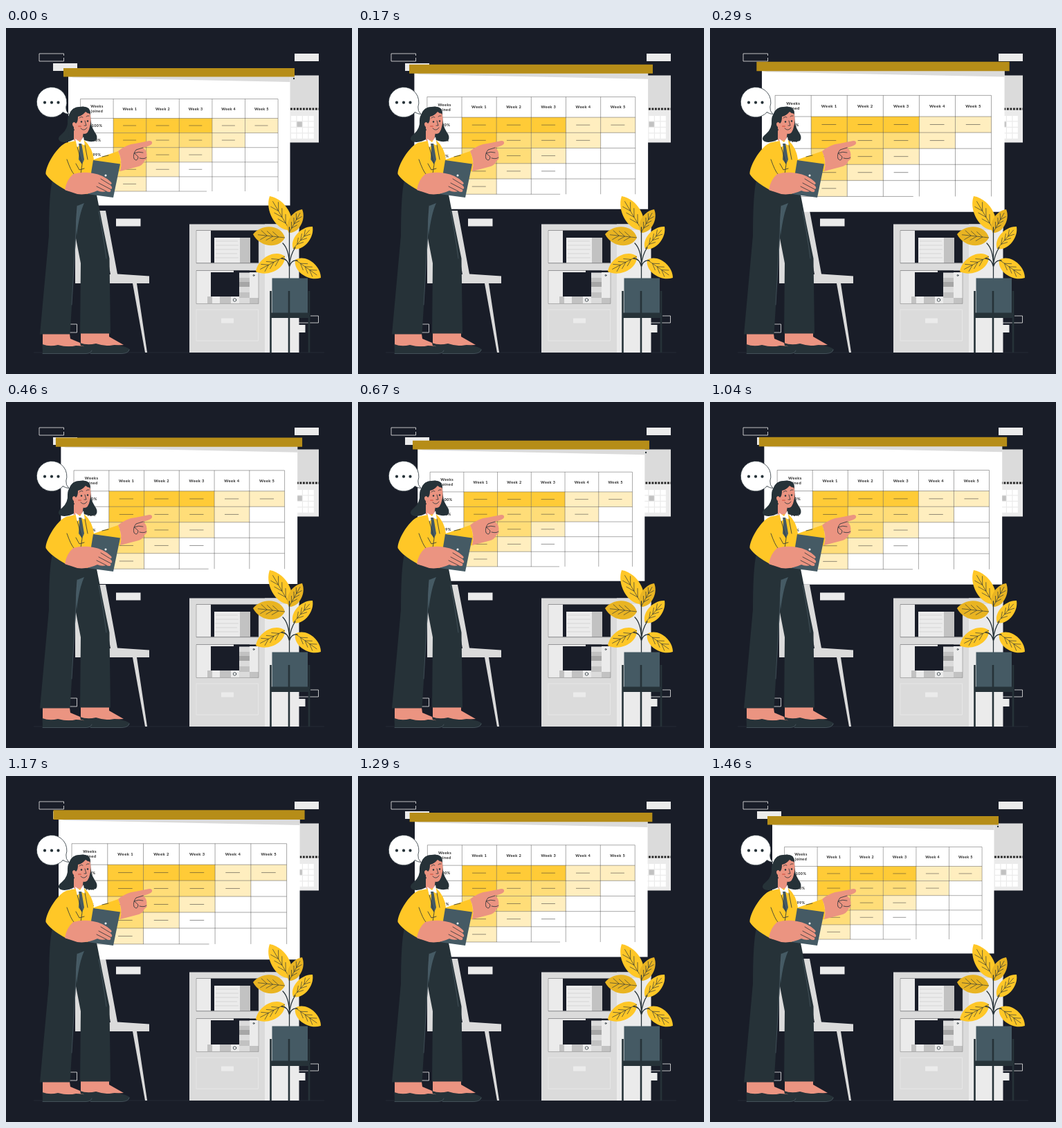
An HTML page that plays this animation: 500x500 px, repeating every 1.5 s.

```html
<!DOCTYPE html>
<html lang="en">
<head>
<meta charset="utf-8">
<title>Weekly retention board</title>
<style>
  html, body { margin: 0; width: 100%; height: 100%; overflow: hidden; background: #191d28; }
  svg { display: block; width: 100vw; height: 100vh; }
  text { font: 700 5.4px Lato, sans-serif; letter-spacing: .4px; text-anchor: middle; fill: #222; }
  .light { fill: #ebebeb; }
  .grey { fill: #dbdbdb; }
  .mid { fill: #c2c2c2; }
  .dark { fill: #263238; }
  .slate { fill: #455a64; }
  .night { fill: #191d28; }
  .gold { fill: #ffc727; }
  .skin { fill: #eb9481; }
  .line { fill: none; stroke: #263238; stroke-width: .8; stroke-linecap: round; stroke-linejoin: round; }
  .edge { fill: none; stroke: #ebebeb; stroke-width: .8; }
</style>
</head>
<body>
<svg viewBox="0 0 500 500">
  <!-- backdrop -->
  <path class="edge" d="M83.500 40V37H48V48H83.500V43M84 428H102.500V440H90M417 426H451.500V416H440"/>
  <path class="light" d="M68 51h35v11h-35zM417 37h35v11h-35zM159 275.500h35.500v11h-35.500zM397 429h35.500v11h-35.500z"/>
  <path d="M40 469H460" stroke="#2a303a" stroke-width=".7"/>
  <g id="calendar">
    <path class="grey" d="M400 68.500h52v51h-52z"/>
    <path class="light" d="M400 119h52v46.500h-52z"/>
    <circle cx="416" cy="73" r="1.200" class="dark"/>
    <path d="M402 117H452" stroke="#222" stroke-width="2.800" stroke-dasharray="2.800 1.700"/>
  </g>

  <!-- cabinet -->
  <path class="grey" d="M265 283.500H374V469H265z"/>
  <path class="light" d="M374 283.500H423.500V469H374z"/>
  <path class="grey" d="M374 283.500H423.500V292H374z"/>
  <path class="night" d="M275 292.500H365V339.500H275zM275 350.500H365V398H275z"/>
  <path class="light" d="M275 292.500h21v47h-21zM301 303h37v36.500h-37zM275 350.500h21v47.500h-21zM296 350.500h33v2.500h-33zM337 353h28v45h-28zM297 388h40v10h-40z"/>
  <path class="mid" d="M338 303h15v36.500h-15zM291 388h7v10h-7zM309 388h16v10h-16zM337 361h15v6h-15zM337 382h15v8h-15zM352 390h13v8h-13z"/>
  <path d="M337 367h15v7h-15z" fill="#a6a6a6"/>
  <path d="M337 353h15v8h-15zM337 374h15v8h-15zM337 390h15v8h-15z" class="grey"/>
  <path d="M303 308h32M303 314h33M302 320h34M303 326h31M302 332h34" stroke="#ccc" stroke-width=".7"/>
  <path class="line" d="M275 339.500V292.500H365V339.500zM275 398V350.500H365V398z" style="stroke:#777;stroke-width:.5"/>
  <path d="M329 352H352" stroke="#191d28" stroke-width="3"/>
  <circle class="line" cx="330.500" cy="393" r="2.200" style="fill:#fff"/>
  <circle class="line" cx="358" cy="357.500" r="1" style="fill:#fff"/>
  <path d="M275 407H364.500V452H275z" fill="none" stroke="#e9e9e9" stroke-width=".8"/>
  <path class="light" d="M311 419.500h18v7h-18z"/>

  <!-- chair -->
  <path class="grey" d="M134.500 264h9.500L161 355.500 207 358.500V369H100V290L109 330V356H151z"/>
  <path class="grey" d="M183 369H189L204 469H201z"/>

  <!-- board, at rest size -->
  <g id="board">
    <path fill="#fff" d="M90 68H410.500V256.500H90z"/>
    <path class="grey" d="M90 70H410.500V78L97 71.500z"/>
    <path fill="#b68d18" d="M83 58H417V70.500H83z"/>
    <g id="table"></g>
  </g>

  <!-- plant -->
  <g id="leaves"></g>
  <path class="line" d="M409.500 362V288M409.500 342Q409 320 400 311M409.500 342Q411 328 418 317M409.500 345Q407 333 398 333M409.500 345Q412 335 421 336" style="stroke-width:1.300"/>
  <path class="slate" d="M384.500 361.500H436V412H384.500z"/>
  <path class="dark" d="M382 411.500H439V419H382z"/>
  <path d="M382.500 380V469M409 380V469M438 380V469" stroke="#263238" stroke-width="2.600"/>

  <!-- trousers and feet -->
  <path class="skin" d="M53 442H92L93 449 119 460 53 461zM108 441H149V446L170 458 108 461z"/>
  <path class="dark" d="M52.500 457Q63 461 75 458 90 462 101 459 121 460 124 466 123 471 114 471H53zM107 455Q117 459 130 456 145 461 157 458 176 460 179 465 177 470 165 471H122Q124 462 108 459z"/>
  <path class="line" d="M53 470.500H116Q123 470 124 466M122 470.500H168Q177 470 178 465" style="stroke:#60707a;stroke-width:.5"/>
  <path class="dark" d="M67 220Q62 240 62 300L49 442.500H92.500L101 304 108 340 107 441.500H151L149.500 333 139 282 130 236z"/>
  <path class="slate" d="M103 257 113 253Q106 268 102 300 100 280 103 257z"/>
  <path class="line" d="M103 257Q99 330 95 400M134 265Q140 295 145 333" style="stroke:#52646d;stroke-width:.6"/>

  <!-- hair behind, neck, shirt -->
  <path class="dark" d="M92 124Q96 113 109 114 122 112 122 124 122 142 128 150 134 158 130 163 122 166 110 161L100 160Q88 167 79 164 72 160 81 153 90 145 89 134 89 128 92 124z"/>
  <path class="skin" d="M98 142 112 150 110 163 106 168 98 162z"/>
  <path class="gold" d="M88 165.500 101 163 113 162Q125 173 127 190L162 178Q168 192 165 207L128 213 119 240 88 235Q64 222 57.500 211C57 199 74 170 88 165.500z"/>
  <path fill="#fff" d="M100 160 107 165 112 157 114 170 108 167 103 173z"/>
  <path class="slate" d="M105 167 109 167 110 172 113 190 110 197 105 190 106 173z"/>
  <path class="line" d="M103 172 110 197 108 211M114 169 118 190M88 190Q94 207 98 211M139 186 148 184M101 196 106 205 113 203"/>

  <!-- head -->
  <path class="skin" d="M98 130C104 126 113 124 116 118L121 122Q124 133 121 143 119 153 113 153 106 152 102 147L101 144Q95 143 96 137z"/>
  <path class="dark" d="M91 126Q95 114 106 114 120 111 122 124 118 124 115 121 110 127 104 128 104 136 101 138 98 134 96 138 96 144 99 147 95 155 91 158L89 140z"/>
  <path class="line" d="M106 130Q109 127 111 129M116 128Q118 126 120 127M114 134 116 141 113 141M108 145Q113 150 117 144"/>
  <circle class="dark" cx="109" cy="135.500" r="1.200"/>
  <circle class="dark" cx="118" cy="134.500" r="1.200"/>
  <path d="M105 142h3" stroke="#db6c5a" stroke-width="2" stroke-linecap="round"/>

  <!-- pointing hand -->
  <path class="skin" d="M162 178Q174 168 187 167L207 163Q212 163 211 167 210 170 198 173 205 178 203 187 205 189 200 192 198 199 188 201L165 207Q169 192 162 178z"/>
  <path class="line" d="M198 173 188 176Q183 182 185 189 190 194 191 186 188 183 185 181 192 178 198 180M203 187Q200 190 193 188"/>

  <!-- tablet and holding hand -->
  <path class="slate" d="M126 191 165 196.500 155 245 118 240z"/>
  <path class="skin" d="M97 211Q112 207 126 210 140 212 151 222 155 226 150 226 156 232 151 233 153 239 145 236 138 238 132 235 117 242 103 240L85 234Q87 220 97 211z"/>
  <path class="line" d="M150 226 137 218M151 233 134 224M145 236 131 229"/>
  <circle cx="144" cy="213" r="1.500" fill="#fff"/>

  <!-- speech bubble -->
  <path class="line" d="M82.300 121.800A21.800 21.800 0 1 1 86.800 114Q86 120 91 124.500 87 124.500 82.300 121.800z" style="fill:#fff"/>
  <path d="M56 107.700h0M66 107.700h0M75.500 107.700h0" stroke="#263238" stroke-width="4.200" stroke-linecap="round"/>
</svg>
<script>
const $ = id => document.getElementById(id);
const rect = (x, y, w, h, fill) => `<rect x="${x}" y="${y}" width="${w}" height="${h}" fill="${fill}"/>`;
const label = (x, y, text) => `<text x="${x}" y="${y}">${text}</text>`;
const stroke = (d, width, color = '#333') => `<path d="${d}" fill="none" stroke="${color}" stroke-width="${width}"/>`;

// Table: one letter per cell, strong / medium / pale / white
const tones = { s: '#ffcb37', m: '#ffdd78', p: '#ffeebf', w: '#fff' };
const rows = ['ssspp', 'smmp', 'mmp', 'mpw', 'p'];
const left = 107.5, top0 = 130.5, cellW = 47.6, cellH = 21.1;
const colX = n => left + n * cellW;
const rowY = n => top0 + n * cellH;

let table = '', lines = '';
rows.forEach((row, r) => [...row].forEach((tone, c) => {
  const x = colX(c + 1), y = rowY(r);
  table += rect(x, y, cellW, cellH, tones[tone]);
  lines += `M${x + 14} ${y + 10.5}h19`;
}));
let grid = `M${left} 102.5H393M${left} 236H290`;
for (let n = 0; n < 7; n++) grid += `M${colX(n)} 102.5V236`;
for (let n = 0; n < 5; n++) grid += `M${left} ${rowY(n)}H393`;
table += stroke(grid, .4) + stroke(lines, .5);
table += label(131.5, 115, 'Weeks') + label(131.5, 121.5, 'joined');
for (let n = 1; n < 6; n++) table += label(colX(n) + cellW / 2, 118.5, 'Week ' + n);
['100%', '90%', '99%'].forEach((text, r) => table += label(131.5, rowY(r) + 12.5, text));
$('table').innerHTML = table;

// Calendar days
let days = '';
for (let r = 0; r < 4; r++) for (let c = 0; c < 4; c++)
  days += rect(412 + c * 8.5, 127 + r * 8.5, 7.3, 7.3, r === 1 && c === 1 ? '#c2c2c2' : '#fff');
$('calendar').innerHTML += days;

// Leaves: base point, tip point, half width
const leaf = (bx, by, tx, ty, width, fill = '#ffc727') => {
  const length = Math.hypot(tx - bx, ty - by);
  const angle = Math.atan2(ty - by, tx - bx) * 180 / Math.PI;
  const at = k => (k * length).toFixed(1);
  const w = width * 1.33;
  let veins = `M0 0H${at(.85)}`;
  for (const k of [.2, .38, .56])
    veins += `M${at(k)} 0L${at(k + .2)} ${width * .5}M${at(k)} 0L${at(k + .2)} ${-width * .5}`;
  return `<g transform="translate(${bx} ${by}) rotate(${angle})">
    <path d="M0 0C${at(.15)} ${-w} ${at(.75)} ${-w} ${at(1)} 0C${at(.75)} ${w} ${at(.15)} ${w} 0 0" fill="${fill}"/>
    ${stroke(veins, .6, '#263238')}</g>`;
};
$('leaves').innerHTML =
  leaf(410, 292, 381, 243, 13) + leaf(409, 296, 428, 262, 9.5, '#e9b422') +
  leaf(403, 303, 357, 298, 13.5, '#e9b422') + leaf(415, 319, 443, 287, 10) +
  leaf(403, 330, 361, 352, 12) + leaf(418, 335, 455, 361, 11.5);

// Two linear pulses per loop, shown at 24 pictures per second
const LOOP = 1500, STEP = LOOP / 36;
const pulse = [[0, 1], [7.3, 1.098], [19.3, .9955], [27, 1.1], [35, 1], [36, 1]];
const scaleAt = step => {
  const i = pulse.findIndex(([at]) => at > step);
  const [a, from] = pulse[i - 1], [b, to] = pulse[i];
  return from + (to - from) * (step - a) / (b - a);
};
function draw() {
  const step = Math.floor((performance.now() % LOOP + 4) / STEP) % 36;
  $('board').setAttribute('transform', `translate(250 157) scale(${scaleAt(step)}) translate(-250 -157)`);
  requestAnimationFrame(draw);
}
draw();
</script>
</body>
</html>
```
